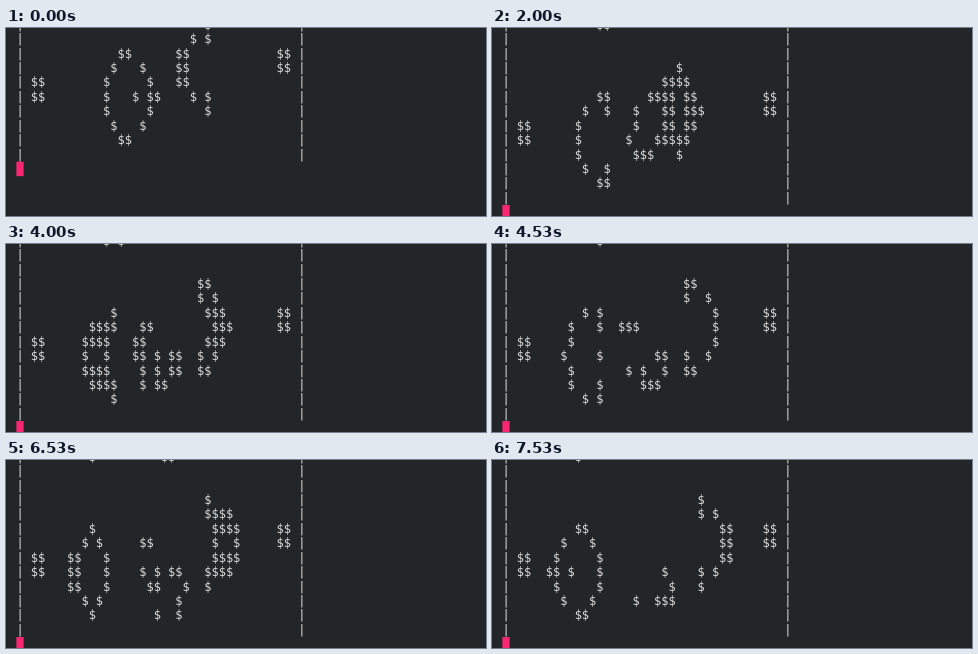
Write an HTML page with a canvas that moves like this. It is 480 px wide and 188 px high and loops after 8000 ms.

```html
<!DOCTYPE html>
<html lang="en">
<head>
<meta charset="utf-8">
<title>Glider gun in a terminal</title>
<style>
  html, body { margin: 0; height: 100%; overflow: hidden; background: #232629; }
  canvas { display: block; width: 480px; height: 188px; }
</style>
</head>
<body>
<canvas id="screen"></canvas>
<script>
const WIDTH = 480, HEIGHT = 188, LOOP = 8000;
const CELL_W = 7.224, CELL_H = 14.43, LEFT = 10.4, BASELINE = 44, ASCENT = 11.3;
const RIGHT_COL = 39, LAST_ROW = 9, BOARD_ROWS = 11;
const CHANGES = [0, 470, 1000, 1470, 2000, 2470, 3000, 3470,
                 4000, 4530, 5000, 5530, 6000, 6530, 7070, 7530];

const GUN = [
  '........................#...........',
  '......................#.#...........',
  '............##......##............##',
  '...........#...#....##............##',
  '##........#.....#...##..............',
  '##........#...#.##....#.#...........',
  '..........#.....#.......#...........',
  '...........#...#....................',
  '............##......................',
];

// A board is a list of rows; row 0 of the gun sits one row below the board's top.
const emptyBoard = () => Array.from({ length: BOARD_ROWS }, () => Array(RIGHT_COL).fill(0));

function firstBoard() {
  const board = emptyBoard();
  GUN.forEach((line, r) => [...line].forEach((ch, c) => {
    board[r + 1][c + 2] = ch === '#' ? 1 : 0;
  }));
  return board;
}

function nextBoard(board) {
  return emptyBoard().map((row, r) => row.map((_, c) => {
    if (c === 0) return 0;
    let near = 0;
    for (let dr = -1; dr <= 1; dr++)
      for (let dc = -1; dc <= 1; dc++)
        if (dr || dc) near += board[r + dr]?.[c + dc] || 0;
    return near === 3 || (near === 2 && board[r][c]) ? 1 : 0;
  }));
}

const boards = [firstBoard()];
while (boards.length < CHANGES.length) boards.push(nextBoard(boards.at(-1)));

const canvas = document.getElementById('screen');
const scale = window.devicePixelRatio || 1;
canvas.width = WIDTH * scale;
canvas.height = HEIGHT * scale;
const ctx = canvas.getContext('2d');
ctx.scale(scale, scale);
ctx.font = '12px "DejaVu Sans Mono", monospace';

function put(ch, col, row) {
  ctx.fillText(ch, LEFT + col * CELL_W, BASELINE + row * CELL_H);
}

function drawBoard(board, top) {
  board.forEach((cells, r) => {
    put('|', 0, top + r);
    put('|', RIGHT_COL, top + r);
    cells.forEach((alive, c) => alive && put('$', c, top + r));
  });
}

function draw(generation) {
  ctx.fillStyle = '#232629';
  ctx.fillRect(0, 0, WIDTH, HEIGHT);

  // The first board ends three lines higher; later ones push the old board up.
  const shift = generation ? 0 : -3;
  const cursorY = BASELINE + (LAST_ROW + 1 + shift) * CELL_H - ASCENT;
  ctx.fillStyle = '#f92672';
  ctx.fillRect(LEFT, cursorY, CELL_W, CELL_H);

  ctx.fillStyle = '#dcdcdc';
  drawBoard(boards[generation], shift - 1);
  if (generation) drawBoard(boards[generation - 1], -1 - BOARD_ROWS);
}

let shown = -1;
function tick() {
  const time = performance.now() % LOOP;
  const generation = CHANGES.findLastIndex(start => start <= time);
  if (generation !== shown) draw(shown = generation);
  requestAnimationFrame(tick);
}
tick();
</script>
</body>
</html>
```
